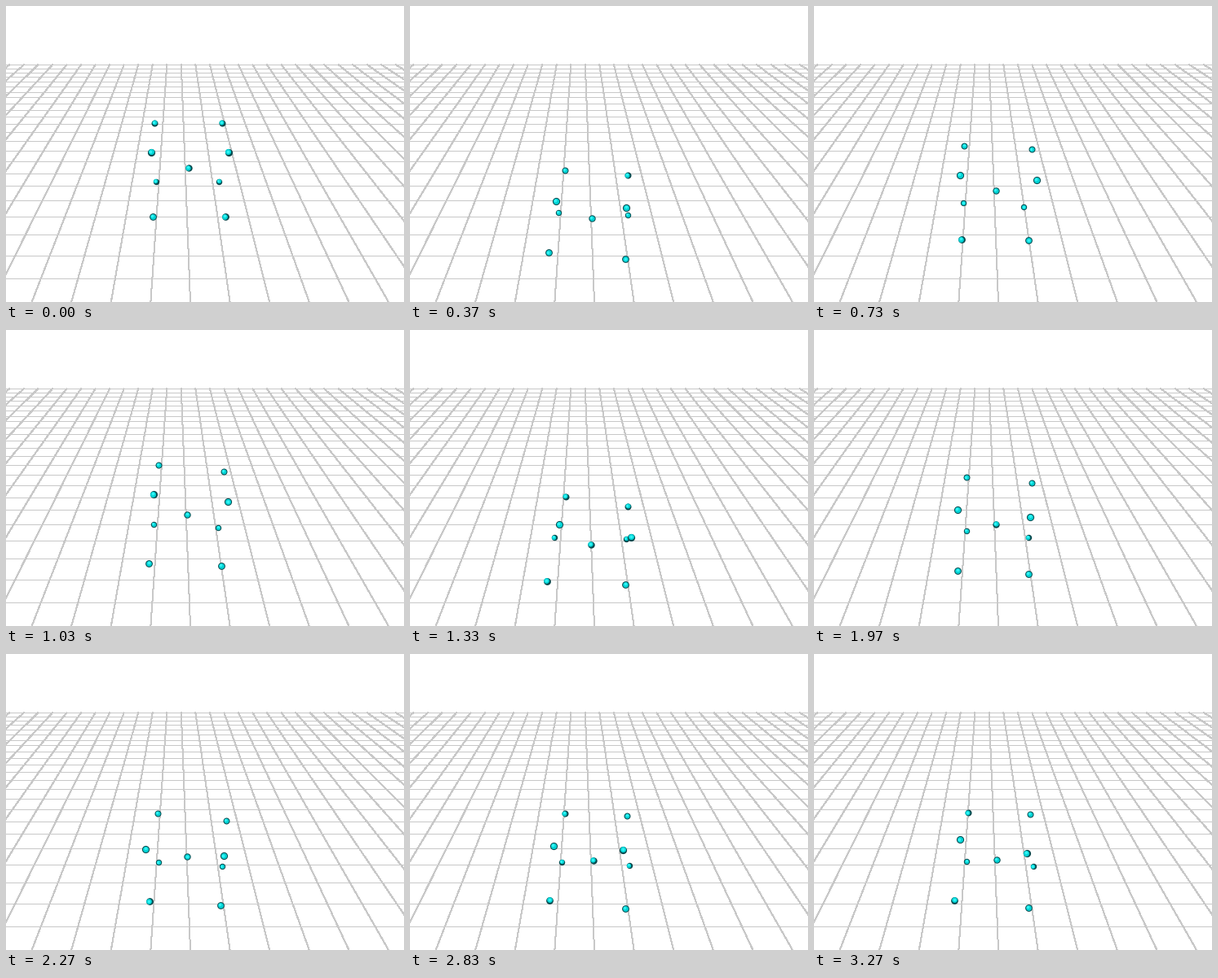
Animation, 488 px wide and 364 px high, one loop 3310 ms. Source, as a matplotlib script:

```python
import numpy as np
import matplotlib.pyplot as plt
from matplotlib.animation import FuncAnimation
from matplotlib.collections import LineCollection

W, H, DPI = 488, 364, 100
LOOP_MS, TICK_MS = 3310, 10
FPS, LAST_STEP = 30, 98
PX = 72 / DPI  # points per pixel

# Perspective floor: vanishing point and rows at y = VY + DEPTH / (k + NEAR)
VX, VY, DEPTH, NEAR, ROWS = 208, -92.5, 5878, 13.75, 22

# Far knees, near knees, far feet, near feet (left, right each), then body
KEY_TIMES = [0, 0.733, 1.333, 1.667, 2.267, 2.833, 3.267]
POSES = np.array([
    [(181.5, 143), (264, 143), (177.5, 179), (272, 179), (183, 215),
     (260.5, 215), (179.5, 258.5), (268, 258.5), (223, 198.5)],
    [(184, 171.5), (266.5, 176), (178.5, 207.5), (272.5, 213.5), (183, 242),
     (257, 247), (180, 286.5), (263, 288), (222.5, 226.5)],
    [(190, 204), (266.5, 216), (182.5, 238.5), (271, 254), (176, 254.5),
     (264.5, 256), (167, 308), (264, 312.5), (221, 263)],
    [(189, 179), (262.5, 182.5), (182.5, 212), (262.5, 221), (187, 247.5),
     (258.5, 260), (177.5, 297), (263, 301), (222.5, 240)],
    [(185.5, 195.5), (269.5, 204.5), (171, 239.5), (266.5, 248), (186.5, 256),
     (264.5, 261), (175, 304), (262.5, 308.5), (222, 249)],
    [(189, 195.5), (266, 198.5), (175.5, 235.5), (261, 240), (185.5, 255),
     (268, 259.5), (171, 302), (263.5, 312.5), (224, 253)],
    [(188, 195), (264.5, 196.5), (178.5, 228), (260, 244.5), (187, 254.5),
     (268, 261), (172, 302), (262.5, 311.5), (223.5, 252.5)],
])
RADII = np.array([4, 4, 4.6, 4.6, 3.7, 3.7, 4.4, 4.4, 4.2])
DRAW_ORDER = [4, 5, 0, 1, 8, 6, 7, 2, 3]

# Bounce extremes: time, pose a, pose b, mix, knee shift, body shift, foot shift
EXTREMES = [
    (0.40, 2, 5, 0.6, 4, 5, 0),
    (0.90, 1, 2, 0.1, -8, -8, -6),
    (1.08, 1, 2, 0.5, -20, -15, -8),
    (1.42, 2, 3, 0.15, 4, 4, 3),
    (1.80, 3, 4, 0.3, -6, -5, -4),
    (2.10, 3, 4, 0.8, -6, -6, -5),
    (2.42, 4, 5, 0.5, 3, 4, 3),
    (2.65, 4, 5, 0.8, -6, -4, -1),
    (3.08, 5, 6, 0.6, -3, -2, 0),
]


def extreme_pose(a, b, mix, knee, body, foot):
    pose = POSES[a] * (1 - mix) + POSES[b] * mix
    pose[:4, 1] += knee
    pose[4:8, 1] += foot
    pose[8, 1] += body
    return pose


keys = list(zip(KEY_TIMES, POSES)) + [(e[0], extreme_pose(*e[1:])) for e in EXTREMES]
keys.sort(key=lambda key: key[0])
times = np.array([t for t, _ in keys])
poses = np.array([p for _, p in keys])
slopes = np.gradient(poses, times, axis=0)
slopes[0] *= 0.4


def pose_at(t):
    """Cubic Hermite interpolation between key poses."""
    i = int(np.clip(np.searchsorted(times, t, side="right") - 1, 0, len(times) - 2))
    span = times[i + 1] - times[i]
    u = min((t - times[i]) / span, 1)
    rise = u * u * (3 - 2 * u)
    return (poses[i] * (1 - rise) + poses[i + 1] * rise
            + span * u * (1 - u) ** 2 * slopes[i]
            - span * u * u * (1 - u) * slopes[i + 1])


def floor_lines():
    rows = VY + DEPTH / (np.arange(ROWS + 1) + NEAR)
    lines = [[(0, np.floor(y) + 0.5), (W, np.floor(y) + 0.5)] for y in rows]
    top, base = rows[-1], H - VY
    for j in range(-18, 19):
        spread = (17.5 + 48.6 * j) / base
        lines.append([(VX + spread * (y - VY) + 0.5, y) for y in (top, H)])
    return lines


fig = plt.figure(figsize=(W / 100, H / 100), dpi=DPI, facecolor="white")
ax = fig.add_axes([0, 0, 1, 1])
ax.set_xlim(0, W)
ax.set_ylim(H, 0)
ax.axis("off")
ax.add_collection(LineCollection(floor_lines(), colors="#c8c8c8",
                                 linewidths=PX, antialiaseds=False))

# Each ball: dark rim, cyan body, small highlight
LAYERS = [("#06484c", 1, 0, 0), ("#00d2d4", 1, -1, -0.15), ("#30f4f4", 0.42, 0, -0.9)]
balls = []
for n, index in enumerate(DRAW_ORDER):
    for color, scale, grow, shift in LAYERS:
        r = RADII[index] * scale + grow
        dot = ax.scatter([0], [0], s=(2 * r * PX) ** 2, c=color,
                         linewidths=0, zorder=3 + n)
        balls.append((dot, index, shift))


def update(tick):
    step = min(int((tick + 0.5) * FPS * TICK_MS / 1000), LAST_STEP)
    pose = pose_at(step / FPS)
    for dot, index, shift in balls:
        dot.set_offsets([pose[index] + 0.5 + shift])
    return [dot for dot, _, _ in balls]


anim = FuncAnimation(fig, update, frames=LOOP_MS // TICK_MS, interval=TICK_MS,
                     init_func=lambda: update(0), repeat=True, repeat_delay=0)
plt.show()
```
